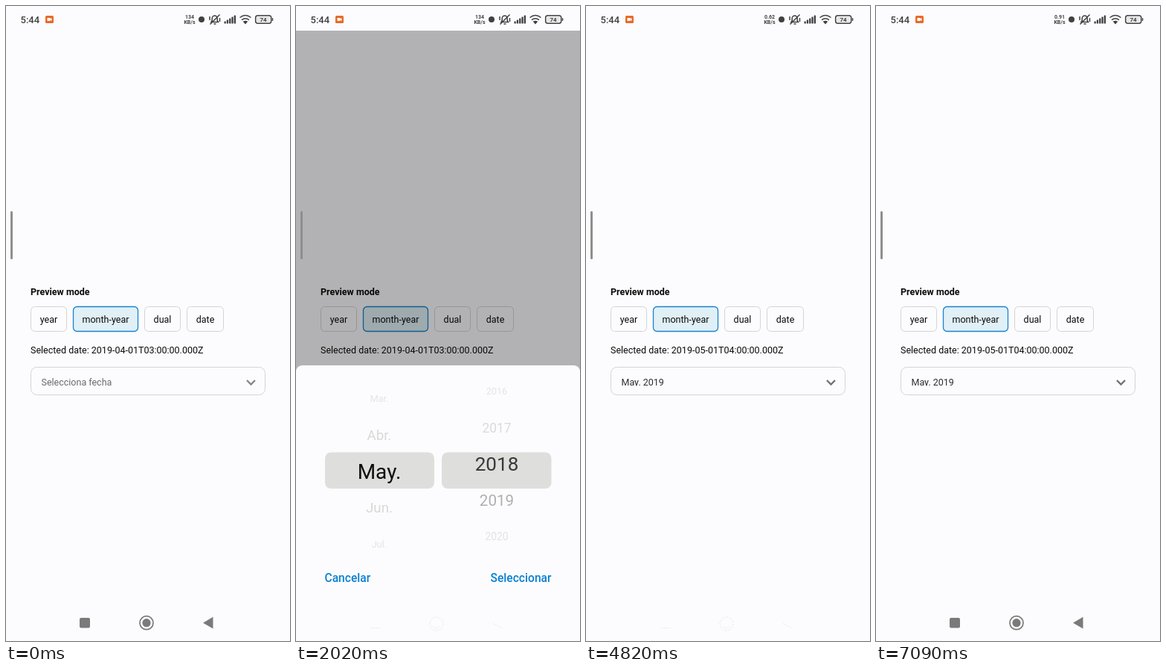
Animation, 382 px wide and 850 px high, one loop 7.34 s. Source, as an HTML page:

```html
<!DOCTYPE html>
<html lang="es">
<head>
<meta charset="utf-8">
<title>Month-year picker</title>
<style>
  html, body { margin: 0; width: 100%; height: 100%; overflow: hidden; background: #fcfcfe; }
  svg { display: block; width: 382px; height: 850px; font-family: Roboto, sans-serif; }
  .body { font-size: 12.5px; fill: #0c0c0c; }
  .outline { fill: none; stroke: #d4d4d4; }
  .status { fill: #404040; }
  .line { fill: none; stroke: #404040; stroke-width: 1.5; }
  .action { font-size: 15.6px; font-weight: 500; fill: #0a80d0; }
  .mid { text-anchor: middle; }
</style>
</head>
<body>
<svg viewBox="0 0 382 850">
  <defs>
    <clipPath id="fieldClip"><rect x="40" y="490" width="270" height="18.6"/></clipPath>
    <clipPath id="wheelClip"><rect x="30" y="501" width="320" height="244"/></clipPath>
  </defs>
  <rect width="382" height="850" fill="#fcfcfe"/>

  <text class="body" x="33" y="387" font-weight="700">Preview mode</text>
  <g id="modes"></g>
  <text class="body" id="selected" x="33" y="465"></text>
  <rect class="outline" x="33.5" y="483.5" width="315" height="37" rx="8"/>
  <g id="field">
    <text class="body" id="value" x="47.5" y="508" clip-path="url(#fieldClip)"></text>
    <path d="M324 501l5.5 5.5 5.5-5.5" fill="none" stroke="#707070" stroke-width="2.3"/>
  </g>

  <path id="dim" d="M0 33H382V491Q382 481 372 481H10Q0 481 0 491Z" fill-opacity=".295"/>
  <rect x="6" y="274.5" width="3" height="64.5" rx="1.5" fill="#8e8e8c"/>

  <g id="sheet">
    <path d="M0 850V491Q0 481 10 481H372Q382 481 382 491V850Z" fill="#fcfcfe"/>
    <g fill="#dededc">
      <rect x="39" y="597.5" width="147" height="48.5" rx="8"/>
      <rect x="196" y="597.5" width="147.5" height="48.5" rx="8"/>
    </g>
    <g id="wheels" class="mid" clip-path="url(#wheelClip)"></g>
    <text class="action" x="38.5" y="770.5">Cancelar</text>
    <text class="action" id="confirm" x="343.5" y="770.5" text-anchor="end">Seleccionar</text>
  </g>

  <g id="nav" fill="#7a7a7a">
    <rect x="99" y="819" width="14" height="13.5" rx="2"/>
    <circle cx="189" cy="825.7" r="9" fill="none" stroke="#7a7a7a" stroke-width="1.7"/>
    <circle cx="189" cy="825.7" r="5.6"/>
    <path d="M265 825.7L278.5 817.8V833.6Z"/>
  </g>
  <g id="faintNav" fill="none" stroke="#e8e8e4" stroke-dasharray="2 1.5">
    <path d="M101 832.5H114M265 826.5l13 7"/>
    <circle cx="189" cy="827" r="9"/>
    <path d="M184 830a6 6 0 0 0 10 0"/>
  </g>

  <g class="status">
    <text x="19.5" y="22.6" font-size="13" font-weight="500">5:44</text>
    <rect x="53" y="13" width="11" height="10" rx="1.5" fill="#e86a28"/>
    <path d="M55.5 16h4v1.2l2-1.2v4l-2-1.2V20h-4z" fill="#fff"/>
    <g class="mid" font-size="7" font-weight="700">
      <text id="rate" x="247" y="17.4"></text>
      <text x="247" y="24">KB/s</text>
    </g>
    <circle cx="263" cy="18" r="4"/>
    <path class="line" d="M276 21.5h9.5l-1.3-2v-3a3.5 3.5 0 0 0-7 0v3zM274.5 24.5l13-13M274 14v5M287.5 16v5M279.5 24h3"/>
    <g id="bars"></g>
    <path class="line" d="M314.5 15.5q7.5-6 15 0M317 18.7q5-4 10 0"/>
    <path d="M318.8 20.8q3.2-2.2 6.4 0l-3.2 3.7z"/>
    <rect class="line" x="335.7" y="12.7" width="21" height="10.6" rx="3" stroke-width="1.2"/>
    <rect x="337" y="14" width="18.4" height="8" rx="1.5" fill="#e8e8e8"/>
    <rect x="357.8" y="16" width="1.5" height="4" rx=".7"/>
    <text class="mid" x="346" y="20.9" font-size="8" font-weight="700">74</text>
  </g>
</svg>
<script>
const LOOP = 7340;
const ROW = 48.7;
const CENTER_Y = 623;
const $ = id => document.getElementById(id);

function add(parent, tag, attrs, text = '') {
  const node = document.createElementNS('http://www.w3.org/2000/svg', tag);
  for (const key in attrs) node.setAttribute(key, attrs[key]);
  node.textContent = text;
  return parent.appendChild(node);
}

const ramp = (t, start, end) => Math.min(1, Math.max(0, (t - start) / (end - start)));
const easeOut = p => 1 - (1 - p) ** 3;
const easeInOut = p => p * p * (3 - 2 * p);
const mix = (a, b, p) => a + (b - a) * p;

for (const [label, x, width] of [['year', 33, 49], ['month-year', 90, 88], ['dual', 186, 49], ['date', 243, 50]]) {
  const box = add($('modes'), 'rect', { class: 'outline', x: x + .5, y: 402.5, width: width - 1, height: 33, rx: 5 });
  if (label === 'month-year') box.style.cssText = 'fill: #e0f0f6; stroke: #1a84d0; stroke-width: 1.3';
  add($('modes'), 'text', { class: 'body mid', x: x + width / 2, y: 423.7 }, label);
}
for (let i = 0; i < 5; i++) {
  const height = 3 + i * 2;
  add($('bars'), 'rect', { x: 293.5 + i * 3.3, y: 23.5 - height, width: 2.3, height, rx: .6 });
}

const makeWheel = (labels, x) => labels.map(label => add($('wheels'), 'text', { x }, label));
const months = makeWheel('Ene Feb Mar Abr May Jun Jul Ago Sep Oct Nov Dic'.split(' ').map(m => m + '.'), 112);
const years = makeWheel(Array.from({ length: 12 }, (_, i) => 2015 + i), 270);

// Rows shrink and fade with their distance from the selected row.
function drawWheel(rows, position) {
  rows.forEach((row, i) => {
    const distance = Math.abs(i - position);
    const near = Math.min(distance, 1), far = Math.min(1, Math.max(0, distance - 1));
    const size = 28 - 9.3 * near - 6.2 * far;
    const tone = mix(mix(16, 216, near), 228, far);
    row.setAttribute('y', CENTER_Y + (i - position) * ROW + size * .355);
    row.setAttribute('font-size', size);
    row.setAttribute('fill', `rgb(${tone},${tone},${tone})`);
    row.setAttribute('display', distance < 2.6 ? 'inline' : 'none');
  });
}

function draw(t) {
  const reopened = t >= 4000;
  const chosen = t >= 3430;
  const open = reopened
    ? ramp(t, 4840, 5110) - ramp(t, 5720, 6020)
    : ramp(t, 150, 450) - ramp(t, 3440, 3740);
  const modal = (t >= 150 && t < 3440) || (t >= 4800 && t < 5720);

  $('dim').setAttribute('opacity', open);
  $('sheet').setAttribute('opacity', open);
  $('nav').setAttribute('display', modal ? 'none' : 'inline');
  $('faintNav').setAttribute('display', modal ? 'inline' : 'none');

  const fieldPress = reopened
    ? .75 * (ramp(t, 4400, 4500) - ramp(t, 4550, 4800))
    : .15 * (1 - ramp(t, 0, 150));
  const confirmPress = reopened ? ramp(t, 5610, 5720) : ramp(t, 3310, 3440);
  $('field').setAttribute('opacity', 1 - fieldPress);
  $('confirm').setAttribute('opacity', 1 - .75 * confirmPress);

  $('selected').textContent = 'Selected date: ' + (chosen ? '2019-05-01T04:00:00.000Z' : '2019-04-01T03:00:00.000Z');
  $('value').textContent = chosen ? 'May. 2019' : 'Selecciona fecha';
  $('value').style.fill = chosen ? '#2c2c2c' : '#505050';
  $('rate').textContent = t < 2470 ? '134' : t < 6470 ? '0.62' : '0.91';

  drawWheel(months, reopened ? 4 : 4 * easeOut(ramp(t, 650, 1300)) + .033 * ramp(t, 2270, 2970));
  drawWheel(years, 4 * easeInOut(ramp(t, 1500, 2230)));
}

const begin = performance.now();
function frame() {
  draw((performance.now() - begin) % LOOP);
  requestAnimationFrame(frame);
}
frame();
</script>
</body>
</html>
```
